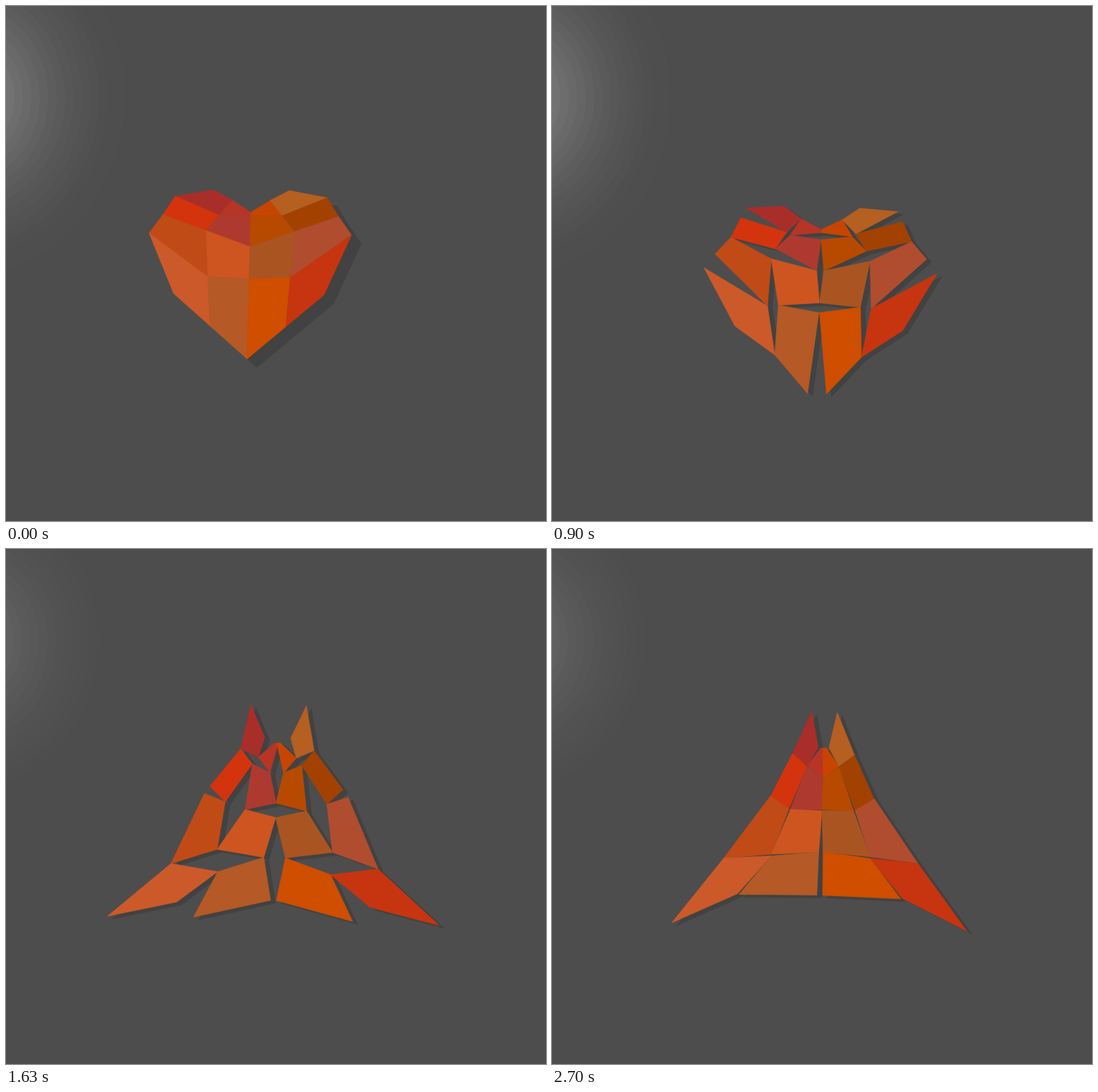
Write an HTML page with a canvas that moves like this. It is 766 px wide and 731 px high and loops after 2730 ms.

```html
<!DOCTYPE html>
<html lang="en">
<head>
<meta charset="utf-8">
<title>Kirigami heart</title>
<style>
  html, body { margin: 0; height: 100%; overflow: hidden; background: #4d4d4d; }
  canvas { display: block; }
</style>
</head>
<body>
<canvas id="stage" width="766" height="731"></canvas>
<script>
const ctx = document.getElementById('stage').getContext('2d');
const LOOP = 2730, STEP = 100 / 3, GLOW_SWITCH = 1100;
const CENTER = [383, 365], TILT = 0.0004, DEGREE = Math.PI / 180;

const add = (a, b) => [a[0] + b[0], a[1] + b[1]];
const sub = (a, b) => [a[0] - b[0], a[1] - b[1]];
const scale = (a, k) => [a[0] * k, a[1] * k];
const rotate = ([x, y], a) => [x * Math.cos(a) - y * Math.sin(a), x * Math.sin(a) + y * Math.cos(a)];
const reflect = (p, middle) => sub(scale(middle, 2), p);
const flip = ([x, y]) => [-x, y];

// Perspective of the tilted table.
function toPlane(p) {
  const d = sub(p, CENTER);
  return scale(d, 1 / (1 + TILT * d[1]));
}
const toScreen = p => add(CENTER, scale(p, 1 / (1 - TILT * p[1])));

// Tile corners of the left half: rim, inner column, axis.
const half = [
  [[-56, -84.5], null, [0, -50.6]],
  [[-112, -74], [-46, -46], [0, -45.5]],
  [null, [-64, -23], [0, 0]],
  [[-146, -18.5], [-58, 43.5], [0, 45.5]],
  [[-104.7, 67], null, [0, 152.5]]
];
// A slit has two equal halves, so its outer end follows from the other two points.
half[0][1] = reflect(half[2][1], half[1][1]);
half[4][1] = reflect(half[2][1], half[3][1]);
half[2][0] = reflect(half[2][2], half[2][1]);
const grid = half.map(([rim, inner, axis]) => [rim, inner, axis, flip(inner), flip(rim)]);

const colors = [
  ['#a92e2a', '#b73526', '#c84500', '#b55f21'],
  ['#d3340d', '#ae3a2f', '#b84a00', '#a34200'],
  ['#c14b16', '#ce5520', '#aa5521', '#b04d2e'],
  ['#cc592a', '#b55926', '#cf4e00', '#c6350f']
];

const settle = (t, tau) => 1 - Math.exp(-t / tau);

// The heart lands, drifts to the middle, swings open and slowly closes the other way.
function poseAt(t) {
  const landed = settle(t, 100), drift = settle(t, 300);
  const swing = 1 / (1 + Math.exp((1273 - t) / 130));
  const creep = Math.max(0, (t - 700) / 2000);
  const opening = (1.2 * landed + 73 * swing + 14.8 * creep) * DEGREE;
  return {
    opening,
    turn: (0.6 + 0.9 * drift) * DEGREE,
    center: [346 + 37 * settle(t, 330), 341.7 + 36 * drift - 7 * Math.sin(opening) ** 2],
    size: 1 - 0.018 * landed,
    shadow: [14 - 7 * landed, 12 - 8 * landed]
  };
}

// Neighbouring tiles turn opposite ways about a shared corner.
function buildTiles({ opening, turn, center, size }) {
  const offsets = [[], [], [], []];
  const turned = (r, c, i, j) => rotate(grid[i][j], turn + ((r + c) % 2 ? -opening : opening));
  const corner = (r, c, i, j) => add(turned(r, c, i, j), offsets[r][c]);
  const attach = (r, c, r2, c2, i, j) => {
    offsets[r][c] = sub(corner(r2, c2, i, j), turned(r, c, i, j));
  };
  const attachAcross = (c, c2) => {
    const j = Math.max(c, c2);
    attach(1, c, 1, c2, j % 2 ? 2 : 1, j);
  };
  const attachDown = (r, r2, c) => {
    const i = Math.max(r, r2);
    attach(r, c, r2, c, i, (i + c) % 2 ? c + 1 : c);
  };
  offsets[1][1] = [0, 0];
  attachAcross(0, 1);
  attachAcross(2, 1);
  attachAcross(3, 2);
  for (let c = 0; c < 4; c++) {
    attachDown(0, 1, c);
    attachDown(2, 1, c);
    attachDown(3, 2, c);
  }
  const middle = scale(add(corner(1, 1, 1, 2), corner(2, 1, 3, 2)), 0.5);
  const origin = toPlane(center);
  const place = p => toScreen(add(origin, scale(sub(p, middle), size)));
  return colors.flatMap((row, r) => row.map((color, c) => ({
    color,
    points: [[r, c], [r, c + 1], [r + 1, c + 1], [r + 1, c]].map(([i, j]) => place(corner(r, c, i, j)))
  })));
}

function drawPolygon(points, color, shift = [0, 0]) {
  ctx.beginPath();
  for (const p of points) ctx.lineTo(...add(p, shift));
  ctx.closePath();
  ctx.fillStyle = ctx.strokeStyle = color;
  ctx.fill();
  ctx.stroke();
}

function drawGlow(reach, strength) {
  for (let r = reach - 10; r > 60; r -= 12) {
    const gray = Math.round(77 + strength * (1 - r / reach) ** 2);
    ctx.beginPath();
    ctx.ellipse(-60, 130, r, r * 1.105, 0, 0, 2 * Math.PI);
    ctx.fillStyle = `rgb(${gray}, ${gray}, ${gray})`;
    ctx.fill();
  }
}

function draw(time) {
  const t = Math.floor((time % LOOP + 4) / STEP) * STEP;
  const pose = poseAt(t), tiles = buildTiles(pose);
  ctx.fillStyle = '#4d4d4d';
  ctx.fillRect(0, 0, 766, 731);
  if (t < GLOW_SWITCH - 1) drawGlow(250, 73);
  else drawGlow(225, 40);
  ctx.lineWidth = 0.7;
  ctx.lineJoin = 'round';
  for (const tile of tiles) drawPolygon(tile.points, '#414241', pose.shadow);
  for (const tile of tiles) drawPolygon(tile.points, tile.color);
}

const start = performance.now();
function tick() {
  draw(performance.now() - start);
  requestAnimationFrame(tick);
}
tick();
</script>
</body>
</html>
```
